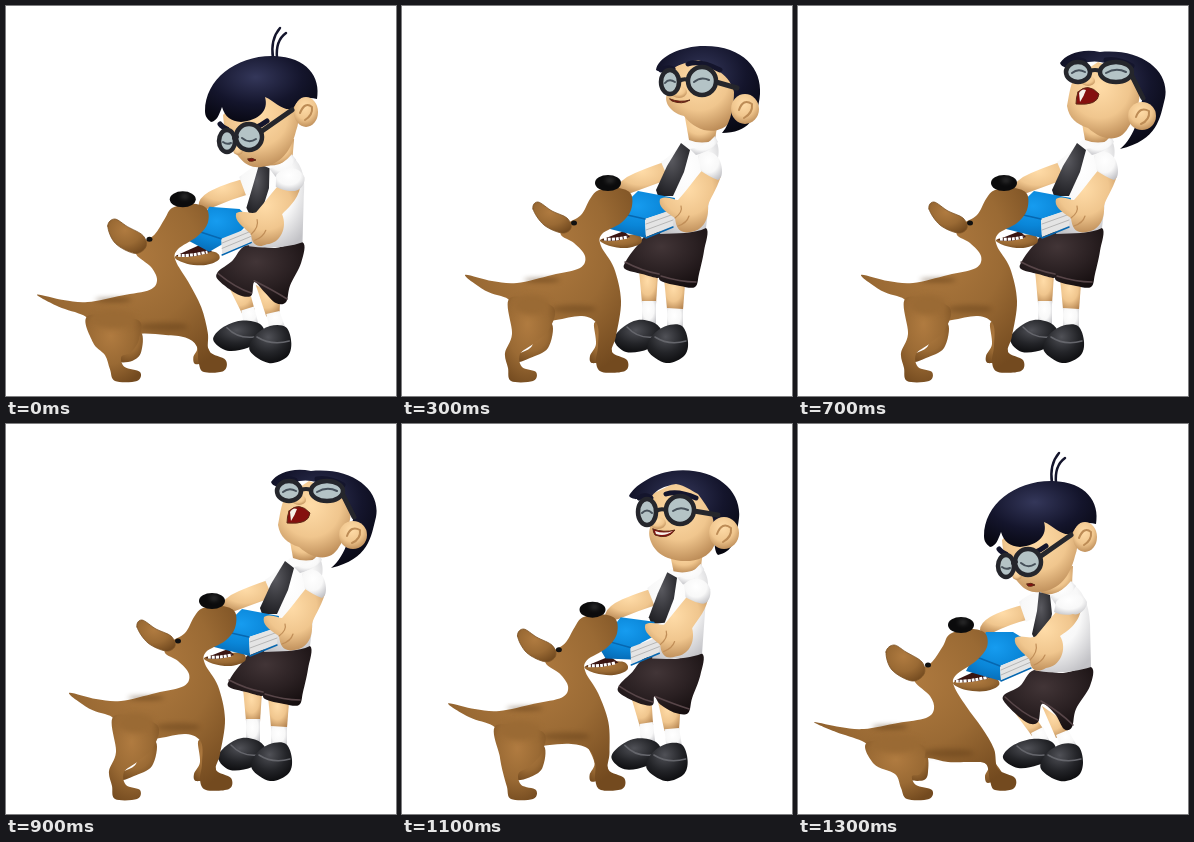
These frames come from a looping animation (390x390 px, 1.8 s). An HTML page:

```html
<!DOCTYPE html>
<html lang="en">
<head>
<meta charset="utf-8">
<title>Boy and dog tugging a book</title>
<style>
html, body { margin: 0; height: 100%; overflow: hidden; background: #fff; }
svg { display: block; width: 100%; height: 100%; }
path { fill: none; stroke-linecap: round; stroke-linejoin: round; }
</style>
</head>
<body>
<svg id="stage" viewBox="0 0 390 390"></svg>
<script>
const stage = document.getElementById('stage');
const NUM = /-?\d+(\.\d+)?/g;

// light, middle and dark tone of each material
const tones = {
  skin: ['#ffdca8', '#f0c68e', '#b58450'],
  dog: ['#b07b40', '#9a6a34', '#734a1f'],
  hair: ['#34375a', '#14152c', '#06060f'],
  cloth: ['#423537', '#2a2022', '#140d0e'],
  shirt: ['#ffffff', '#f8f8f8', '#c2c2c6'],
  book: ['#169cf0', '#0a86d8', '#0667b0'],
  shoe: ['#505157', '#232428', '#09090b'],
  tie: ['#5a5a60', '#37373c', '#1c1c20']
};
stage.innerHTML = '<defs>' + Object.entries(tones).map(([id, [a, b, c]]) =>
  `<radialGradient id="${id}" cx=".45" cy=".32" r=".75"><stop stop-color="${a}"/>
   <stop offset=".55" stop-color="${b}"/><stop offset="1" stop-color="${c}"/></radialGradient>`).join('') +
  '</defs>';

// Shapes are path strings; "O x y rx ry" is an oval, "B x y ..." a smooth closed blob.
function mix(a, b, k) {
  const to = b.match(NUM);
  let i = 0;
  return a.replace(NUM, v => +v + (to[i++] - v) * k);
}

function toPath(s) {
  const n = (s.match(NUM) || []).map(Number);
  if (s[0] === 'O') {
    const [x, y, rx, ry] = n;
    return `M${x - rx},${y}a${rx},${ry} 0 1 0 ${2 * rx},0a${rx},${ry} 0 1 0 ${-2 * rx},0Z`;
  }
  if (s[0] !== 'B') return s;
  const len = n.length;
  const at = i => n[(i + len) % len];
  let d = `M${n[0]},${n[1]}`;
  for (let i = 0; i < len; i += 2) {
    const p = j => [at(i + j), at(i + j + 1)];
    const [a, b, c, e] = [p(-2), p(0), p(2), p(4)];
    d += `C${b.map((v, j) => v + (c[j] - a[j]) / 6)} ${c.map((v, j) => v - (e[j] - b[j]) / 6)} ${c}`;
  }
  return d + 'Z';
}

const parts = [];
function add(group, look, ...poses) {
  const el = document.createElementNS('http://www.w3.org/2000/svg', 'path');
  el.style.cssText = look;
  group.append(el);
  parts.push({ el, poses, head: group !== stage });
}
const body = (...a) => add(stage, ...a);
const fill = id => `fill:url(#${id})`;
const line = (color, w) => `stroke:${color};stroke-width:${w}`;
const soft = (color, o) => `fill:${color};opacity:${o};filter:blur(2.5px)`;

// Boy below the neck: crouched pose, upright pose
body(fill('skin'), 'M214,285 L238,294 L246,306 L234,312Z', 'M237,264 L256,268 L254,298 L240,297Z');
body(fill('shirt'), 'M233,309 L245,303 L252,318 L238,322Z', 'M240,295 L254,295 L254,320 L240,320Z');
body(fill('skin'), 'M244,282 L270,300 L270,309 L258,314Z', 'M262,272 L283,278 L281,304 L265,303Z');
body(fill('shoe'), 'B205,334 214,322 234,315 254,318 258,332 240,341 220,344',
  'B212,334 220,322 236,314 254,318 260,330 246,343 224,346');
body(line('#65666c', 1.5), 'M219,322 Q230,333 246,331', 'M225,321 Q236,333 252,331');
body(fill('shirt'), 'M258,311 L270,306 L279,322 L264,326Z', 'M265,302 L281,303 L281,325 L265,325Z');
body(fill('shoe'), 'B243,345 248,330 264,320 280,322 285,338 280,352 262,357',
  'B246,345 250,330 264,320 280,320 286,336 282,350 264,357');
body(line('#65666c', 1.5), 'M250,331 Q265,340 283,335', 'M253,331 Q267,340 284,335');
body(fill('cloth'),
  'B236,246 265,249 293,243 292,262 278,285 274,303 266,305 257,290 244,280 240,298 228,298 208,280 206,271 222,262',
  'B249,226 278,227 304,222 302,245 297,268 293,281 278,280 259,275 257,268 256,272 240,268 223,263 224,255 235,240');
body(line('#584649', 1.5), 'M207,273 Q225,290 240,296 M243,277 Q262,288 275,301',
  'M223,256 Q240,265 257,268 M259,270 Q278,276 294,276');
body(fill('skin'), 'M232,179 Q204,186 192,193 Q182,199 182,206 Q186,212 194,209 Q212,200 232,195Z',
  'M268,154 Q238,164 225,171 Q214,178 215,186 Q222,190 229,187 Q248,180 270,172Z');
body(fill('shirt'),
  'M240,166 L272,158 C284,165 291,178 292,200 L293,243 C275,249 250,250 236,246 C236,232 243,222 244,210 L236,194 L228,198 L221,178 C230,170 236,170 240,166Z',
  'M284,134 L312,131 C318,140 319,150 310,170 L304,222 C292,228 275,227 258,228 C262,215 265,200 268,185 L268,176 L266,172 L259,156 C268,150 276,142 284,134Z');
body(fill('skin'), 'M238,148 L275,142 L274,160 Q258,172 244,171Z', 'M282,106 L316,114 L313,134 Q300,139 287,134Z');
body(fill('tie'), 'M241,168 L252,171 L254,190 L248,214 L238,218 L234,210 L239,187Z',
  'M279,137 L288,144 L282,166 L271,190 L256,190 L254,184 L265,160Z');
body(fill('shirt'), 'M252,172 Q264,168 273,157 L278,162 Q270,176 258,181Z',
  'M288,143 Q304,141 313,130 L316,136 Q308,146 294,149Z');

// Head: looking down, smiling, looking up, laughing
const face = document.createElementNS('http://www.w3.org/2000/svg', 'g');
stage.append(face);
const head = (...a) => add(face, ...a);
const tuft = 'M285,56 C285,56 285,56 285,56 M288,56 C288,56 288,56 288,56';
head(line('#14152c', 2.5), 'M254,59 C252,46 255,36 261,29 M258,59 C257,48 260,39 267,34',
  tuft, tuft, tuft);
head(fill('skin'),
  'M204,116 C205,130 209,145 213,150 C220,157 226,170 242,168 C262,166 272,152 277,132 C282,120 280,104 270,96 L230,90Z',
  'M246,72 C244,84 246,92 248,104 C245,112 250,128 266,134 C282,140 305,138 312,122 C318,108 318,86 308,72 L275,58Z',
  'M268,60 C266,72 266,80 265,88 C262,94 266,106 282,110 C296,128 318,130 330,114 C338,100 340,80 330,65 L298,48Z',
  'M276,72 C272,80 271,90 269,100 C271,112 278,118 290,122 C306,136 322,136 330,122 C340,108 346,84 338,70 L300,56Z');
head(fill('hair'),
  'M186,112 C186,80 218,56 255,57 C288,58 302,78 298,100 C288,97 278,100 274,110 C262,112 256,102 246,98 C250,112 240,121 222,123 C212,122 206,118 203,108 C200,116 198,122 192,123 C188,120 186,117 186,112Z',
  'M227,72 C232,62 250,50 270,47 C312,42 340,66 337,94 C334,118 330,128 316,131 C310,126 314,100 310,92 C306,84 302,78 296,70 C288,66 284,62 274,60 C262,62 254,66 250,72 C242,77 230,76 227,72Z',
  'M254,64 C256,52 274,42 298,40 C340,38 360,62 358,88 C356,112 346,127 320,127 C330,116 332,96 332,86 C330,78 326,72 318,66 C310,60 304,56 296,54 C286,56 278,58 272,62 C266,66 258,67 254,64Z',
  'M262,57 C268,48 284,42 302,46 C345,42 372,66 367,92 C362,112 360,134 322,143 C338,130 342,106 344,94 C342,84 338,78 332,72 C322,62 312,58 302,56 C292,54 282,58 276,62 C270,62 264,62 262,57Z');
head(fill('skin'), 'O287 113 12 15', 'O322 109 15 16', 'O343 103 14 15', 'O344 110 14 14');
head(line('#bd8c56', 2), 'M281,114 Q286,102 293,108 Q294,116 286,121', 'M315,110 Q320,97 329,104 Q330,113 321,118',
  'M337,104 Q341,92 350,98 Q351,107 342,112', 'M338,111 Q342,100 351,105 Q352,114 343,118');
head(fill('skin'), 'O219 151 5 5', 'O256 99 8 6', 'O277 86 8 6', 'O290 75 7 5');
head(line('#14152c', 5), 'M201,125 Q203,128 208,130 M224,131 Q236,131 248,122', 'M237,74 Q243,69 249,74 M264,70 Q276,66 294,74',
  'M259,64 Q266,60 271,63 M286,58 Q298,54 318,64', 'M272,55 Q278,52 286,55 M308,54 Q320,52 334,60');
head(line('#25262c', 5), 'M243,132 L273,111', 'M292,87 L316,91', 'M314,76 L335,82', 'M334,70 L345,92');
const lens = 'fill:#b4c3c6;' + line('#25262c', 4.5);
head(lens, 'O208 142 8 11', 'O245 88 9 13', 'O268 76 9 12', 'O280 66 12 10');
head(lens, 'O230 138 13 13', 'O278 86 14 14', 'O300 75 14 14', 'O318 66 16 10');
head(line('#25262c', 4), 'M215,139 L218,138', 'M254,87 Q259,84 264,86', 'M277,75 Q282,72 286,74', 'M292,65 Q297,63 302,65');
head(line('#46505a', 2), 'M204,143 Q208,146 212,144 M223,139 Q230,145 237,140', 'M240,89 Q245,84 250,89 M271,87 Q278,82 286,86',
  'M263,77 Q267,72 273,76 M292,76 Q299,70 307,74', 'M274,67 Q280,62 287,66 M308,67 Q318,61 328,66');
head('fill:#85100f;' + line('#5e2a17', 1), 'M229,160 Q233,158 237,161 Q233,163 230,162 Q229,161 229,160Z',
  'M251,105 Q262,109 273,106 Q266,116 253,111 Q251,108 251,105Z',
  'M268,93 Q278,97 288,94 Q280,99 270,95 Q268,94 268,93Z',
  'M280,86 Q290,76 301,88 Q300,100 278,98 Q278,92 280,86Z');
head('fill:#f6f2ea', 'M233,161 Q233,161 233,161 Q233,161 233,161Z', 'M253,107 Q262,110 271,107 Q263,113 254,110Z',
  'M278,96 Q278,96 278,96 Q278,96 278,96Z', 'M281,87 Q284,82 288,84 Q286,90 282,96Z');

// Jaw and book
body(fill('dog'), 'B155,259 172,253 196,254 201,261 188,267 168,266', 'B198,234 215,230 236,229 239,237 225,242 208,240');
body('fill:#3a1512', 'M156,257 L182,245 L196,252 Q172,261 156,257Z', 'M199,234 L222,225 L228,231 Q212,237 199,234Z');
body(line('#fff', 3) + ';stroke-dasharray:3 1;stroke-linecap:butt', 'M158,257 Q170,258 190,253', 'M202,233 Q212,234 226,231');
body(fill('book'), 'M188,208 L215,208 L233,219 L232,230 L202,242 L203,257 L168,247 L178,232Z',
  'M236,185 L273,192 L271,204 L243,213 L244,232 L204,222 L212,208Z');
body('fill:#e4e4e4', 'M202,242 L233,229 L233,243 L203,256Z', 'M243,213 L272,203 L271,220 L244,231Z');
body(line('#aaa', .8), 'M203,246 L233,233 M203,251 L233,238', 'M244,218 L272,208 M244,224 L271,214');
body(line('#0667b0', 1.5), 'M202,242 L176,232 M203,257 L233,244', 'M243,213 L212,206 M244,232 L271,221');

// Dog
body(fill('dog'), 'B108,325 128,330 130,348 126,356 112,356 110,350 118,342', 'B130,318 150,318 146,342 128,352 116,356 112,350 130,340');
body(fill('dog'), 'B180,318 198,340 204,352 190,359 187,352 190,342 176,330', 'B198,320 210,345 203,354 190,357 188,350 194,338 192,318');
body(fill('dog'),
  'B16,298 42,303 66,305 100,299 128,294 136,285 132,272 117,258 119,248 134,238 145,222 152,210 172,205 187,209 189,223 178,237 158,251 156,262 168,282 184,304 196,325 200,345 217,354 215,365 197,366 192,357 188,340 172,338 150,338 130,334 105,335 80,328 64,317 38,308',
  'B63,269 90,275 115,277 150,269 178,262 183,250 172,237 159,229 163,219 179,209 188,193 197,184 216,182 229,188 229,204 219,217 200,228 199,240 212,262 219,295 214,330 210,346 225,354 223,365 200,366 194,356 196,340 195,318 180,310 154,314 128,318 110,305 106,293 84,285');
body(soft('#4a2b0c', .5), 'O92 303 18 2', 'O140 274 18 2');
body(soft('#4a2b0c', .3), 'O150 329 26 4', 'O172 303 22 4');
body(fill('dog'), 'B70,318 122,320 126,338 122,350 114,352 118,361 134,366 131,375 109,375 103,364 97,350 76,340',
  'B108,292 150,300 148,322 131,338 118,348 120,361 134,366 131,375 109,375 106,362 103,347 110,328');
body(soft('#9a6a34', 1), 'O98 320 24 9', 'O130 299 18 10');
body('fill:#111', 'O130 241 3 2.5', 'O172 217 3 2.5');
body(fill('dog') + ';' + line('#7d5426', .8), 'B88,228 96,221 108,228 124,238 126,250 114,257 94,246',
  'B131,203 136,196 150,205 165,212 169,222 160,227 142,219');
body('fill:#0b0b0c', 'O163 201 13 8', 'O206 177 13 8');
body(soft('#777', .7), 'O165 198 4 1.5', 'O208 174 4 1.5');

// Near arm and sleeve
body(fill('skin'),
  'M258,188 L283,185 C281,200 268,208 262,212 C270,225 262,243 248,244 C238,250 232,245 232,236 C225,228 215,222 217,214 C224,210 232,216 238,212 C244,205 250,197 258,188Z',
  'M302,162 L319,170 C314,185 308,192 306,200 C307,215 300,225 288,226 C278,228 274,222 273,212 C262,205 256,200 258,193 C265,189 272,194 276,194 C284,185 292,174 302,162Z');
body(line('#c08e58', 1.2), 'M232,236 Q240,228 238,220 M236,241 Q244,238 247,231', 'M273,212 Q281,206 279,200 M276,220 Q285,217 287,210');
body(fill('shirt'), 'M258,178 C266,168 284,166 289,178 C289,186 280,192 275,190 C268,192 260,190 256,188Z',
  'M296,150 C304,142 316,146 319,158 C321,166 320,172 316,174 C310,172 304,168 299,165Z');

// One entry per 100 ms: uprightness, head pose from, to, blend, shift x, shift y
const [DOWN, SMILE, UP, LAUGH] = [0, 1, 2, 3];
const steps = [
  [.32, DOWN, DOWN, 0, 13, -7],
  [.64, DOWN, SMILE, .6, 4, -2],
  [.9, SMILE, UP, .7, 0, 0],
  [1, UP, UP, 0, 0, 0],
  [1, UP, LAUGH, .4, 0, 0],
  [1, UP, LAUGH, .8, 0, 0],
  [1, UP, LAUGH, .9, 0, 0],
  [1, LAUGH, LAUGH, 0, 0, 0],
  [1, LAUGH, LAUGH, 0, 4, 0],
  [1, LAUGH, LAUGH, 0, 3, 1],
  [.9, LAUGH, SMILE, .5, 0, 0],
  [.64, SMILE, SMILE, 0, 0, 0],
  [.32, SMILE, DOWN, .5, 6, -3],
  [0, DOWN, DOWN, 0, 0, 0]
];

let shown = -1;
function draw() {
  const step = Math.min(13, Math.floor(performance.now() % 1800 / 100));
  if (step !== shown) {
    shown = step;
    const [rise, from, to, blend, dx, dy] = steps[step];
    for (const { el, poses, head } of parts) {
      const shape = head ? mix(poses[from], poses[to], blend) : mix(poses[0], poses[1], rise);
      el.setAttribute('d', toPath(shape));
    }
    face.setAttribute('transform', `translate(${dx} ${dy})`);
  }
  requestAnimationFrame(draw);
}
draw();
</script>
</body>
</html>
```
